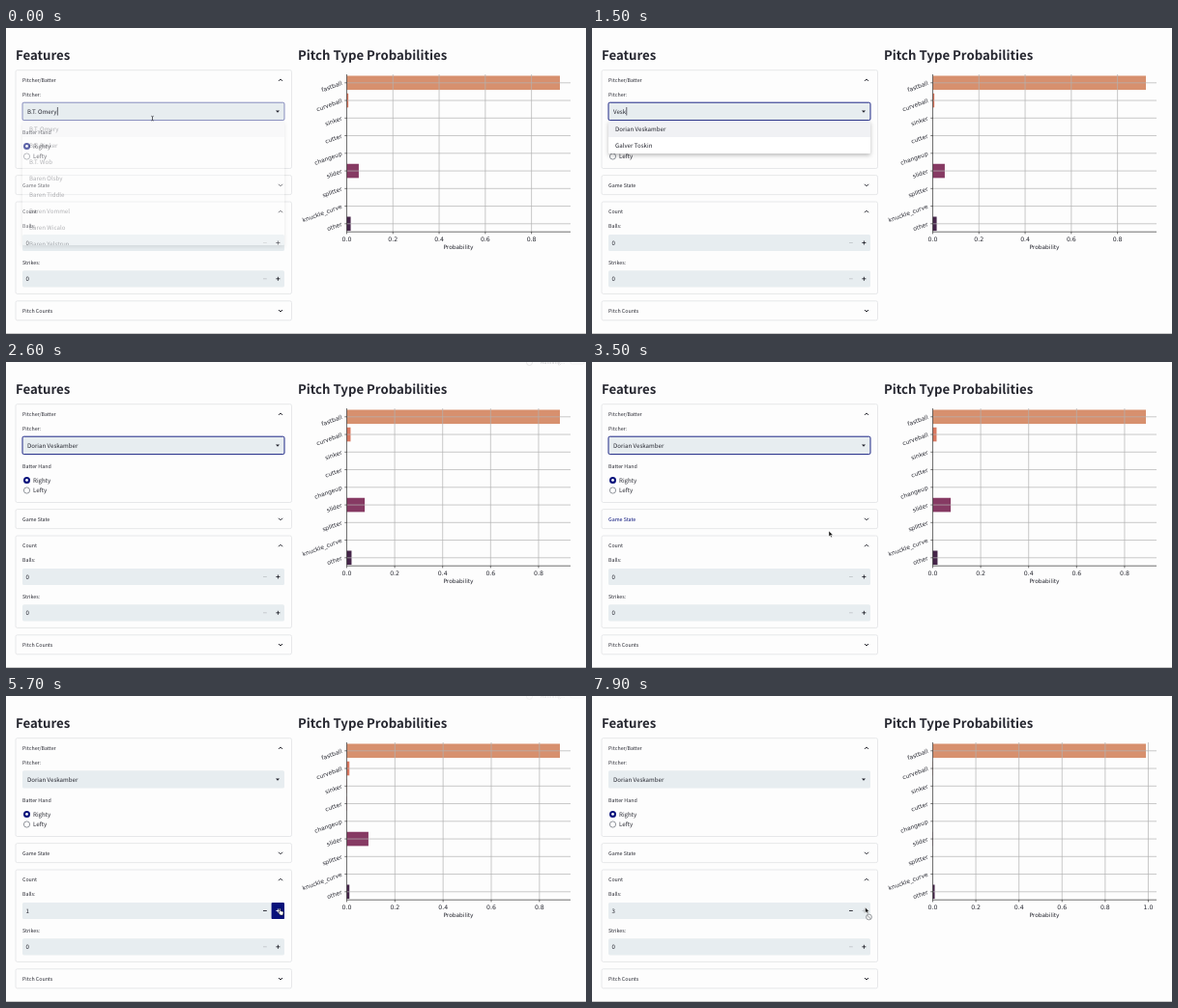
Write an HTML page that moves like this. It is 600 px wide and 317 px high and loops after 8000 ms.

```html
<!DOCTYPE html>
<html lang="en">
<head>
<meta charset="utf-8">
<title>Pitch Type Probabilities</title>
<style>
html, body { margin: 0; width: 100%; height: 100%; overflow: hidden; background: #fdfdfd; }
svg { display: block; width: 100vw; height: 100vh; }
text {
  font-family: "Noto Sans CJK JP", "Noto Sans CJK SC", "Noto Sans CJK", "Open Sans", sans-serif;
  text-rendering: geometricPrecision;
  white-space: pre;
}
.plot text { font-family: "DejaVu Sans", sans-serif; }
</style>
</head>
<body>
<svg id="stage" viewBox="0 0 600 317" preserveAspectRatio="none"></svg>
<script>
const LOOP = 8000, STEP = 100;
const INK = '#262730', NAVY = '#06107a', FIELD = '#e7edf0', FAINT = '#c3c8cc';
const LABEL = 5.3, BODY = 6.15;
const stage = document.getElementById('stage');

const names = [
  'B.T. Omery', 'B.T. Rinker', 'B.T. Wob', 'Baren Olsby', 'Baren Tiddle', 'Baren Vommel',
  'Baren Wicalo', 'Baren Yelstrup', 'Corvel Tunsby', 'Davin Prelto', 'Dorian Veskamber',
  'Elvor Medrin', 'Evan Trostel', 'Galver Toskin', 'Havel Brisner', 'Ivo Lantress', 'Kelvo Drandel'
];
const before = names[0], chosen = 'Dorian Veskamber', query = 'Vesk';
const keyTimes = [800, 1000, 1200, 1400];
const closeAt = 1700, blurAt = 5200;
const clicks = [5200, 6000, 6800];
const reruns = [2200, ...clicks];

const pitches = ['fastball', 'curveball', 'sinker', 'cutter', 'changeup', 'slider', 'splitter', 'knuckle_curve', 'other'];
const hues = ['#d7906e', '#d8775f', '#cf615d', '#bb5060', '#a04566', '#863a63', '#6c3162', '#552b5a', '#452549'];
const charts = [
  [0, [.923, .007, 0, 0, 0, .052, 0, 0, .017]],
  [2400, [.889, .016, 0, 0, 0, .075, 0, 0, .02]],
  [5500, [.885, .011, .001, .001, 0, .09, 0, 0, .011]],
  [6300, [.882, .006, .002, .002, 0, .104, 0, 0, .005]],
  [7100, [.989, .001, 0, 0, 0, .001, 0, 0, .009]]
];
const track = [[3100, 152, 95], [3300, 205, 140], [3500, 245, 175], [3900, 262, 200], [4400, 274, 214], [4800, 283, 221]];

const clamp = (v, a = 0, b = 1) => Math.min(b, Math.max(a, v));
const text = (x, y, s, size = LABEL, extra = '') =>
  `<text x="${x}" y="${y}" font-size="${size}" fill="${INK}" ${extra}>${s}</text>`;
const rect = (x, y, w, h, fill, extra = '') =>
  `<rect x="${x}" y="${y}" width="${w}" height="${h}" fill="${fill}" ${extra}/>`;
const line = (d, color, width, extra = '') =>
  `<path d="${d}" fill="none" stroke="${color}" stroke-width="${width}" ${extra}/>`;
const chevron = (y, up) =>
  line(up ? `M282 ${y + 1}l2-2 2 2` : `M282 ${y - 1}l2 2 2-2`, INK, 1);

function panel(y, h, title, open, hot) {
  return rect(10, y, 285.5, h, 'none', 'stroke="#e1e2e5" stroke-width=".8" rx="1.7"') +
    text(17, y + 12.4, title, LABEL, hot ? `style="fill:${NAVY}"` : '') +
    chevron(y + 10.2, open);
}

function matches(typed) {
  const pattern = new RegExp([...typed].join('.*'), 'i');
  return names.filter(n => pattern.test(n)).slice(0, 8);
}

function dropdown(typed, alpha) {
  const list = matches(typed), h = Math.min(list.length * 17, 129);
  return `<g opacity="${alpha}">` +
    rect(17, 96, 271, h, '#fff', 'rx="1.5" filter="url(#shade)"') +
    rect(17, 96, 271, 17, '#f0f1f4') +
    `<g clip-path="url(#list)">` +
    list.map((n, i) => text(24, 106.5 + i * 17, n, BODY)).join('') + '</g></g>';
}

function selectBox(t) {
  const typed = query.slice(0, keyTimes.filter(k => t >= k).length);
  const typing = typed && t < closeAt;
  const value = t >= closeAt ? chosen : typed || before;
  const focus = t < blurAt ? clamp(.5 + t / 400) : 0;
  const caret = focus && (typing || t % 1000 < 500);
  return rect(17, 77.2, 271, 18.4, FIELD, `rx="1.6" stroke="${NAVY}" stroke-width=".9" stroke-opacity="${focus}"`) +
    `<text id="value" x="22" y="88.8" font-size="${BODY}" fill="${INK}">${value}</text>` +
    `<path id="caret" fill="${INK}" opacity="${caret ? 1 : 0}" d="M0 82h.7v8.6h-.7z"/>` +
    `<path d="M279 85.6h4l-2 2.2z" fill="${INK}"/>`;
}

function radio(y, on, label) {
  return (on
    ? `<circle cx="21.5" cy="${y}" r="3.5" fill="${NAVY}"/><circle cx="21.5" cy="${y}" r="1.4" fill="#fff"/>`
    : `<circle cx="21.5" cy="${y}" r="3.1" fill="#fff" stroke="#777b84" stroke-width=".8"/>`) +
    text(28, y + 2.3, label, BODY);
}

function stepper(y, n, max, hot) {
  const plus = n >= max ? FAINT : hot ? '#fff' : INK;
  return rect(17, y, 271, 17.2, FIELD, 'rx="1.6"') +
    (hot && n < max ? rect(274.6, y, 13.4, 17.2, NAVY, 'rx="1.2"') : '') +
    text(20.4, y + 10.9, n, BODY) +
    line(`M266 ${y + 8.6}h3.8`, n ? INK : FAINT, .9) +
    line(`M279.4 ${y + 8.6}h4m-2-2v4`, plus, .9);
}

function chart(t) {
  const data = charts.filter(c => t >= c[0]).pop()[1];
  const x0 = 352.5, top = 48, foot = 211.2, right = 584;
  const unit = 220.5 / data[0], row = i => 56.8 + i * 18.25;
  let out = '', grid = '', ticks = '';
  data.forEach((v, i) => {
    const y = row(i);
    out += rect(x0, y - 7.3, v * unit, 14.6, hues[i]);
    grid += `M${x0} ${y}H${right}`;
    ticks += `M${x0 - 2.2} ${y}h2.2`;
    out += text(0, 0, pitches[i], 6, `text-anchor="end" transform="translate(348 ${y + 2})rotate(-20)"`);
  });
  for (let k = 0; k * .2 * unit < right - x0; k++) {
    const x = x0 + k * .2 * unit;
    if (k) grid += `M${x} ${top}V${foot}`;
    ticks += `M${x} ${foot}v2.2`;
    out += text(x, 220.7, (k * .2).toFixed(1), 6.2, 'text-anchor="middle"');
  }
  return '<g class="plot">' + out + line(grid, '#b2b2b2', .7) +
    line(`M${x0} ${top}V${foot}H${right}` + ticks, '#333', .7) +
    text(468, 228.8, 'Probability', 5.9, 'text-anchor="middle"') + '</g>';
}

function status(t) {
  const start = reruns.filter(r => t >= r).pop();
  if (start === undefined) return '';
  const d = t - start, alpha = .6 * clamp(Math.min((d + 100) / 200, (600 - d) / 500));
  return `<g opacity="${alpha}"><circle cx="541.5" cy=".5" r="3" fill="none" stroke="#888" stroke-width=".8"/>` +
    text(553, 1.6, 'Running...', LABEL) + rect(584, -6, 14, 8, 'none', 'stroke="#aaa" stroke-width=".6" rx="1"') + '</g>';
}

function mouseAt(t) {
  const i = track.findIndex(p => p[0] > t);
  if (i < 0) return track[track.length - 1].slice(1);
  if (!i) return track[0].slice(1);
  const [t0, x0, y0] = track[i - 1], [t1, x1, y1] = track[i], f = (t - t0) / (t1 - t0);
  return [x0 + (x1 - x0) * f, y0 + (y1 - y0) * f];
}

function arrow(x, y) {
  return `<path transform="translate(${x} ${y})" d="M0 0v5.8l1.4-1.2 1 2.2 1-.5-1-2.1h1.9z" fill="#111" stroke="#fff" stroke-width=".5"/>`;
}

function pointer(t) {
  if (t < keyTimes[0])
    return line('M150.3 91.2l1.2.6 1.2-.6M150.3 96l1.2-.6 1.2.6M151.5 91.8v3.6', INK, .7);
  if (t < track[0][0]) return '';
  if (t < 4900) return arrow(...mouseAt(t));
  if (t < 6900)
    return '<path transform="translate(281.5 219.8)" d="M1.2 4V.7q.6-.8 1.2 0v2.2l2.5.6q.7.3.6 1L5 7.2H2.2L.1 4.7q.2-.9 1.1-.2z" fill="#fff" stroke="#111" stroke-width=".5"/>';
  return arrow(282.6, 219) +
    '<circle cx="286.5" cy="229" r="2.9" fill="#f4f4f4" stroke="#8d9196" stroke-width=".9"/>' +
    line('M284.5 227l4 4', '#8d9196', .9);
}

const defs = `<defs>
  <clipPath id="list"><rect x="17" y="96" width="271" height="129"/></clipPath>
  <filter id="shade" x="-5%" y="-20%" width="110%" height="160%">
    <feDropShadow dx="0" dy="2" stdDeviation="2.2" flood-color="#000" flood-opacity=".25"/>
  </filter></defs>`;

function draw(t) {
  const typed = query.slice(0, keyTimes.filter(k => t >= k).length);
  const menu = t < closeAt ? clamp(.35 + t / 300) : clamp(1 - (t - closeAt + 100) / 200);
  const [, my] = mouseAt(t - 100);
  const moving = t > 3100 && t < 4400;
  const balls = clicks.filter(c => t >= c).length;

  stage.innerHTML = defs + rect(0, 0, 600, 317, '#fdfdfd') +
    text(10, 32.8, 'Features', 13.2, 'font-weight="700"') +
    text(302, 32.8, 'Pitch Type Probabilities', 13.2, 'font-weight="700"') +
    panel(43.7, 101.8, 'Pitcher/Batter', true) +
    text(17, 71, 'Pitcher:') + selectBox(t) +
    text(17, 109.8, 'Batter Hand') +
    radio(122.4, true, 'Righty') + radio(133, false, 'Lefty') +
    panel(152.6, 20, 'Game State', false, moving && my > 152 && my < 173) +
    panel(180, 95.4, 'Count', true, moving && my > 180 && my < 199) +
    text(17, 207, 'Balls:') + stepper(213.9, balls, 3, t >= 4900) +
    text(17, 244.6, 'Strikes:') + stepper(251.2, 0, 2, false) +
    panel(282.8, 20, 'Pitch Counts', false) +
    (menu > 0 ? dropdown(typed, menu) : '') +
    chart(t) + status(t) +
    rect(0, 316, 600, 1, '#c9c9c9') + pointer(t);

  const end = 22.4 + stage.querySelector('#value').getComputedTextLength();
  stage.querySelector('#caret').setAttribute('transform', `translate(${end} 0)`);
}

let shown = -1;
function tick() {
  const t = Math.floor(performance.now() % LOOP / STEP) * STEP;
  if (t !== shown) draw(shown = t);
  requestAnimationFrame(tick);
}
tick();
</script>
</body>
</html>
```
